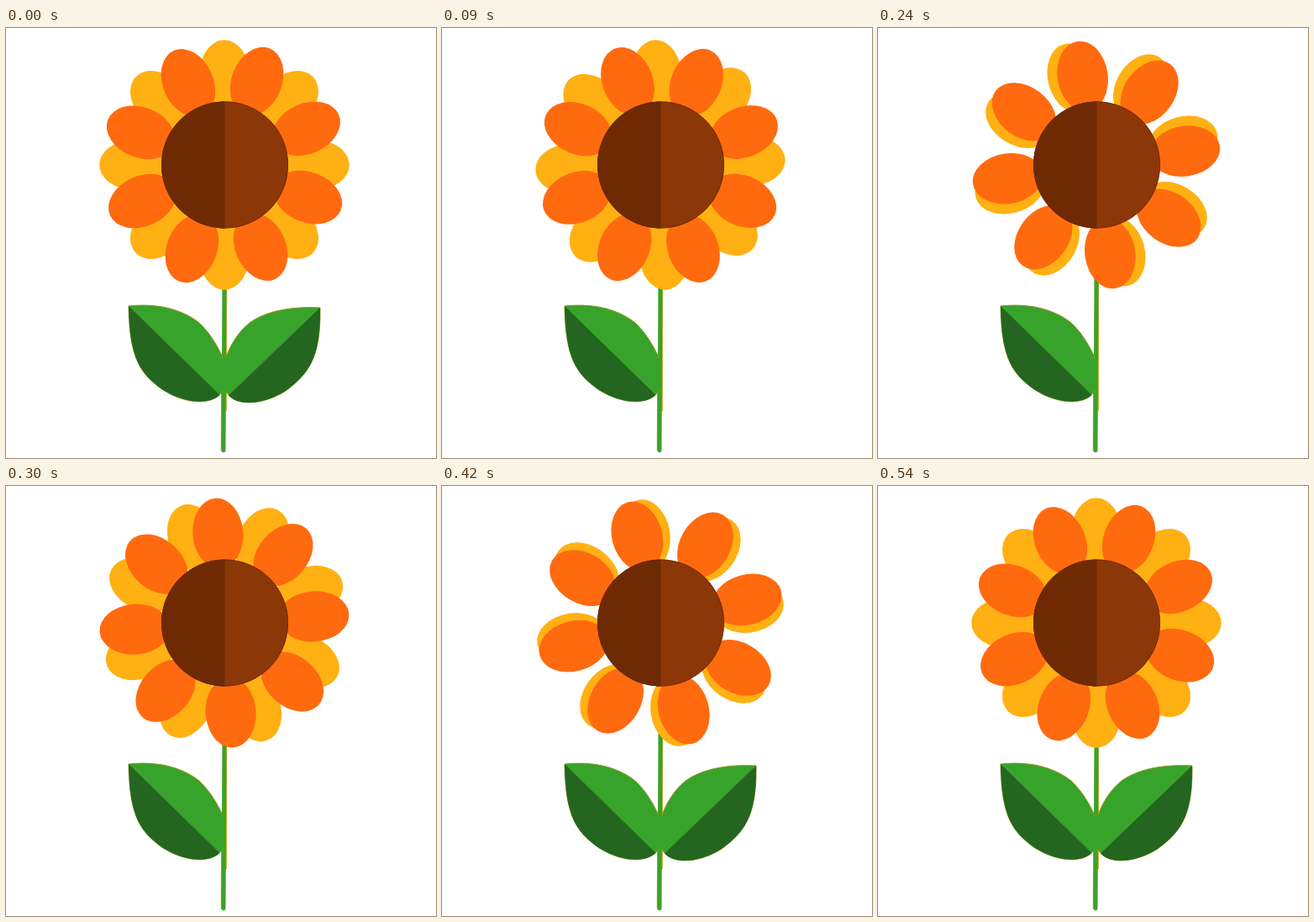
Write an HTML page that moves like this. It is 512 by 512 pixels and loops after 750 ms.

```html
<!DOCTYPE html>
<html lang="en">
<head>
<meta charset="utf-8">
<title>Sunflower</title>
<style>
  html, body { margin: 0; width: 100%; height: 100%; overflow: hidden; background: #fff; }
  svg { display: block; width: 100vw; height: 100vh; }
</style>
</head>
<body>
<svg viewBox="0 0 512 512">
  <g id="stem" fill="none" stroke-linecap="round">
    <path d="M261.3 240L260.9 455" stroke="#d9a51c" stroke-width="4"/>
    <path d="M258.3 434L258 502" stroke="#b9a01c" stroke-width="4.5"/>
    <path d="M260.3 240L259 503" stroke="#38a32b" stroke-width="5"/>
  </g>
  <g id="left">
    <path d="M146 331C185 327 212 337 230 351C244 364 254 382 261 399L261 430L254 437C240 450 211 446 187 431C160 412 147 394 146 331Z" fill="#38a32b" stroke="#93981f" stroke-width="1"/>
    <path d="M146 331L254.5 437C240 450 211 446 187 431C160 412 147 394 146 331Z" fill="#24661f"/>
    <path d="M256 394H261.5V431H256Z" fill="#38a32b"/>
  </g>
  <g id="right">
    <path d="M374 333C337 331 308 338 290 351C275 363 266 380 261.5 393L261 432L265 437C277 451 308 448 333 432C360 412 375 393 374 333Z" fill="#38a32b" stroke="#93981f" stroke-width="1"/>
    <path d="M374 333L265 437.5C277 451 308 448 333 432C360 412 375 393 374 333Z" fill="#24661f"/>
    <path d="M258.5 396L261.5 393L264 396V432H258.5Z" fill="#38a32b"/>
  </g>
  <g id="back" fill="#ffb013"></g>
  <g id="front" fill="#ff6a0f"></g>
  <circle cx="260.5" cy="163" r="75.5" fill="#8c3707"/>
  <path d="M260.5 87.5A75.5 75.5 0 0 0 260.5 238.500Z" fill="#6f2a04"/>
  <circle cx="260.5" cy="163" r="75.1" fill="none" stroke="#682805" stroke-width="0.8"/>
</svg>
<script>
const LOOP = 750, STEP = 30, CX = 260, CY = 163;
const $ = id => document.getElementById(id);
const parts = { stem: $('stem'), left: $('left'), right: $('right') };
const back = $('back'), front = $('front');

// [step, degrees]
const BACK_TURN = [[2, 0], [10, -20], [18, 0]];
const FRONT_TURN = [[2, 21.2], [3, 23.6], [6, 31.5], [10, 40.9], [12, 35], [14, 30], [18, 21.2]];
// Step at which each part comes back after the first one
const SHOW_AT = { stem: 2, left: 3, right: 11 };

function addPetals(group) {
  for (let i = 0; i < 8; i++) {
    const e = document.createElementNS('http://www.w3.org/2000/svg', 'ellipse');
    e.setAttribute('cx', CX);
    e.setAttribute('cy', CY - 106.8);
    e.setAttribute('rx', 30);
    e.setAttribute('ry', 42);
    e.setAttribute('transform', `rotate(${i * 45} ${CX} ${CY})`);
    group.appendChild(e);
  }
}

function valueAt(keys, x) {
  if (x <= keys[0][0]) return keys[0][1];
  for (let i = 1; i < keys.length; i++) {
    const [x0, y0] = keys[i - 1], [x1, y1] = keys[i];
    if (x <= x1) return y0 + (y1 - y0) * (x - x0) / (x1 - x0);
  }
  return keys[keys.length - 1][1];
}

function turn(group, deg) {
  group.setAttribute('transform', `rotate(${deg} ${CX} ${CY})`);
}

function draw(ms) {
  const step = Math.min(18, Math.floor((ms % LOOP) / STEP));
  turn(back, valueAt(BACK_TURN, step));
  turn(front, valueAt(FRONT_TURN, step));
  for (const name in parts) {
    const shown = step === 0 || step >= SHOW_AT[name];
    parts[name].setAttribute('visibility', shown ? 'visible' : 'hidden');
  }
}

addPetals(back);
addPetals(front);
draw(0);

let start;
function tick(now) {
  if (start === undefined) start = now;
  draw(Math.max(0, now - start));
  requestAnimationFrame(tick);
}
requestAnimationFrame(tick);
</script>
</body>
</html>
```
